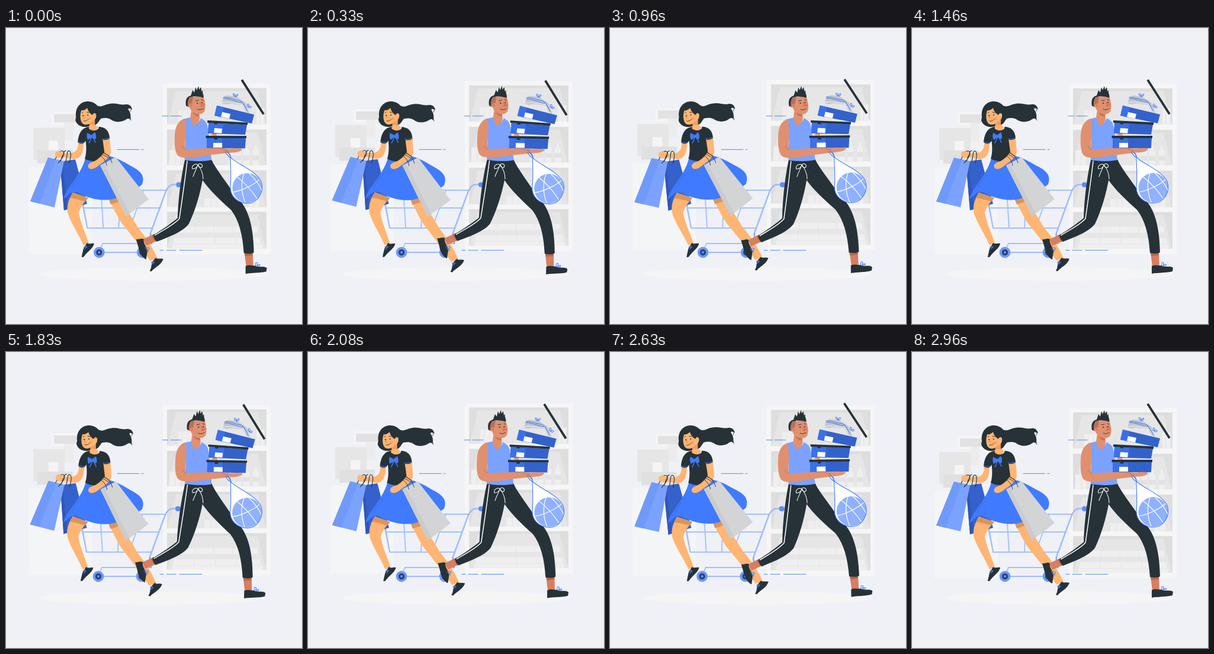
An HTML page that plays this animation: 500x500 px, repeating every 3 s.

```html
<!DOCTYPE html>
<html lang="en">
<head>
<meta charset="utf-8">
<title>Shopping rush</title>
<style>
html, body { margin: 0; width: 100%; height: 100%; overflow: hidden; background: #eff1f6; }
svg { display: block; width: 100%; height: 100%; }
.line { fill: none; stroke-linecap: round; stroke-linejoin: round; }
.blue { stroke: #407bff; }
.dark { stroke: #263238; }
.white { stroke: #fff; }
</style>
</head>
<body>
<svg viewBox="0 0 500 500" xmlns="http://www.w3.org/2000/svg">
  <ellipse cx="250" cy="415.500" rx="193" ry="11.500" fill="#f5f5f5"/>

  <g id="store">
    <path fill="none" stroke="#edeef2" stroke-width=".6" d="M38 54H242V339H38ZM254 54H459V339H254ZM0 382.500H500"/>
    <path fill="#f4f5f6" d="M38 235H145V382.500H38Z"/>
    <path fill="#f5f5f5" d="M77 142H121V164H77Z"/>
    <path fill="#e2e2e3" d="M81 146H119V160H81Z"/>
    <path fill="#ececed" d="M98 160H114V191H98Z"/>
    <path fill="#e6e6e7" d="M46 169H99V223H46Z"/>
    <path fill="#e0e0e1" d="M53 207H113V229H53Z"/>
    <path fill="#f5f5f5" d="M72 191H88V207H72Z"/>
    <path fill="#f6f6f6" d="M265 94.500H447V382.500H265Z"/>
    <g id="bays"></g>
  </g>

  <path class="line blue" stroke-width=".9" d="M264 148.700H274M278 148.700H296M188 205.300H225M229 205.300H232M260 375.400H266M271 375.400H287M293 375.400H331"/>

  <g id="cart">
    <g class="line" stroke="#a3c0ff" stroke-width="1.900">
      <path d="M126 274H271M127 289L137 338H247M130 304H259M160 274L164 338M193 274L190 338M232 274L209 338"/>
      <path d="M126 274L137 338M163 364L157 378M163 364H246"/>
      <path stroke="#7ba2ff" stroke-width="2.200" d="M288 264.500C277 264 274 267 270 275L244 346C242 352 247 356 246 364M157 379H230"/>
      <path stroke="#dce6ff" stroke-width=".7" d="M288 264.500C277 264 274 267 270 275L244 346M157 379H230"/>
    </g>
    <rect x="287" y="260.500" width="9" height="8.500" rx="4" fill="#5b8cf5"/>
    <g id="wheels"></g>
  </g>

  <g id="woman">
    <path fill="#3561cc" d="M91 226L117 222L137 297L98 308Z"/>
    <path fill="#2f57b8" d="M91 226L95 225L104 306L98 308Z"/>
    <path fill="#ffb573" d="M113 278C105 290 102 303 105 314C110 330 123 348 131 367L140 364C136 350 126 330 123 312C126 302 132 294 139 287Z"/>
    <path fill="#d9955c" d="M113 278L139 287L134 293C126 291 117 288 108 287Z"/>
    <path fill="#ffb573" d="M173 288C183 306 188 320 199 334C213 351 229 371 244 393L256 389C250 374 236 352 223 337C213 320 200 300 187 285Z"/>
    <path fill="#d9955c" d="M173 288L187 285L193 293L177 298Z"/>
    <path fill="#263238" d="M131 373L137 363C141 366 145 363 149 364C148 372 138 377 131 387L128 387C129 381 130 378 131 373ZM248 394L253 388C257 391 261 388 266 390C262 401 250 405 246 411L243 410C247 404 245 399 248 394Z"/>
    <path class="line blue" stroke-width="1" d="M137 369C129 375 131 366 137 370M137 370L133 374M250 395C243 400 246 391 251 396L247 399"/>
    <path fill="#407bff" d="M134 220C130 236 119 252 109 266C103 274 99 281 97 289C106 283 110 274 121 278C135 286 155 292 175 290C190 288 220 273 230 264C234 252 231 244 215 235C203 229 193 221 174 216C160 226 145 226 134 220Z"/>
    <path class="line" stroke="#3365d6" stroke-width=".7" d="M127 247C120 254 115 261 111 270"/>

    <path fill="#263238" d="M118 150C116 134 126 124 138 124C147 124 152 129 154 131C161 135 166 129 175 128C186 126 194 131 202 129C208 128 212 132 213 138C210 135 207 135 206 137C210 142 211 148 210 155C207 151 204 153 200 156C192 160 182 159 176 154C170 151 165 152 160 153C156 158 154 164 148 164L136 167C126 168 119 163 117 156Z"/>
    <path class="line dark" stroke-width=".8" d="M204 130C210 131 212 136 210 141M204 150C208 149 210 152 211 156"/>
    <path fill="#f09c5e" d="M141 158L140 169C144 176 152 175 155 168L150 163V155Z"/>
    <path fill="#ffb573" d="M127 139C124 148 125 158 130 162C136 165 142 162 146 157C150 157 153 151 152 146C150 142 147 144 146 147C142 145 138 140 137 135C134 138 130 140 127 139Z"/>
    <path fill="#ffb573" d="M143 163C146 165 152 163 154 168C153 174 144 175 140 169Z"/>
    <circle cx="141" cy="153" r="2.300" fill="#ff8c5a" opacity=".6"/>
    <path class="line dark" stroke-width=".9" d="M128 144L130 142M136 142L140 143M131 157C134 158 137 156 139 154"/>
    <path class="line" stroke="#e07f43" stroke-width=".8" d="M132 147L130 152L133 152"/>
    <g fill="#263238"><circle cx="130" cy="148" r="1"/><circle cx="138" cy="147" r="1"/></g>

    <path fill="#ffb573" d="M122 193C122 204 119 208 112 211L96 212C90 205 82 208 83 214C84 220 92 220 97 218L113 221C125 222 131 214 131 193Z"/>
    <path fill="#263238" d="M137 168C146 176 154 174 158 167L166 170C168 185 167 200 174 216C160 227 145 227 133 221C137 208 135 196 134 186Z"/>
    <path fill="#263238" d="M140 167C127 168 122 180 121 193C125 196 129 196 132 194L139 184Z"/>
    <path fill="#ffb573" d="M163 187L166 209C160 219 150 226 142 228C137 231 138 238 144 238C150 238 154 234 158 231C168 225 177 216 177 209L175 185Z"/>
    <path fill="#263238" d="M156 167C168 167 174 174 175 186C172 189 166 190 162 188Z"/>
    <path class="line blue" stroke-width=".8" d="M122 192C126 194 129 194 132 193M162 187C167 188 171 187 174 185"/>
    <path fill="#407bff" d="M144 181L137 177C136 181 136 186 138 189L144 185L151 188C153 184 152 179 150 176Z"/>
    <path class="line blue" stroke-width="1.500" d="M144 182C144 188 142 191 140 194M145 182C148 186 149 190 151 193"/>
    <path class="line dark" stroke-width=".9" d="M164 211C168 212 171 215 174 216M163 214C167 215 169 217 172 219"/>

    <path fill="#7ba2ff" d="M71 219L98 225L82 303L41 293Z"/>
    <path fill="#709afa" d="M71 219L84 222L57 297L41 293Z"/>
    <path class="line dark" stroke-width="1.100" d="M83 222C88 211 91 206 96 208C101 211 95 221 88 228M101 225C104 215 102 206 107 208C111 211 109 219 107 228M92 225C96 216 96 208 101 207"/>
    <path fill="#ffb573" d="M84 210C88 207 94 208 97 212L92 219C87 220 83 217 83 213Z"/>
    <path fill="#d3d4d6" d="M159 232L185 218L241 289L203 318Z"/>
    <path fill="#cacbcd" d="M159 232L165 229L209 313L203 318Z"/>
    <path class="line dark" stroke-width=".9" d="M163 209C172 214 177 220 179 228M158 215C164 218 169 224 170 232"/>
    <path fill="#ffb573" d="M141 229C147 225 154 224 159 227C156 234 148 239 142 238C137 236 138 231 141 229Z"/>
  </g>

  <g id="man">
    <path fill="#d77f5f" d="M232 357L251 348L257 359L237 368ZM403 379L417 378L418 402L406 403Z"/>
    <path fill="#b8664c" d="M246 351L251 348L257 359L253 361ZM403 379L417 378V384L404 385Z"/>
    <path fill="#263238" d="M220 357C225 358 229 354 233 357C231 364 239 370 239 378L237 391C231 389 225 379 224 371ZM405 402C411 399 417 402 421 401C427 405 436 401 441 405L440 411C430 414 416 413 405 415Z"/>
    <path class="line blue" stroke-width="1" d="M235 372C244 368 245 376 237 374C244 378 241 378 237 374M422 401C420 394 428 394 424 401C432 396 431 404 424 401"/>
    <path fill="#263238" d="M302 223L347 222C352 235 374 262 388 284C408 301 418 330 419 379C414 382 408 381 402 380C400 350 394 325 380 307C362 291 343 273 332 257C328 280 320 308 309 331C298 345 275 353 255 361C251 358 250 354 249 350C265 340 278 331 290 321C291 290 295 255 302 223Z"/>
    <path class="line white" stroke-width="1.500" d="M306 225C302 260 297 294 293 322C283 333 268 340 252 350"/>
    <path class="line white" stroke-width="1" d="M324 231C318 228 313 234 315 238C320 238 323 235 324 231C328 227 333 231 331 235C328 237 325 235 324 231C322 238 318 244 316 251M325 232C330 239 333 247 333 255"/>

    <path fill="#7ba2ff" d="M299 154L311 151C314 163 324 166 329 152L336 157C341 162 340 167 342 177L347 223C332 226 315 225 302 223C300 210 303 200 303 190Z"/>
    <path fill="#e0906f" d="M313 138L326 143L327 152C327 160 321 163 318 166C314 160 311 156 311 151Z"/>
    <path fill="#c9745a" d="M315 142L326 145L326 149C321 150 317 147 315 142Z"/>
    <path fill="#e0906f" d="M310 117L333 115C336 124 338 134 335 141C330 148 321 146 315 142C309 137 308 128 310 117Z"/>
    <path fill="#b5705a" d="M306 133C304 124 306 119 310 116L316 116L314 128L311 134Z"/>
    <path fill="#263238" d="M304 132C302 121 305 116 312 114L315 105L318 109L320 100L322 105L325 98L326 104L329 100L330 107L332 105C331 111 335 114 333 118C325 115 317 115 310 117C307 121 306 127 307 132Z"/>
    <circle cx="312" cy="131" r="3.600" fill="#e0906f"/>
    <circle cx="333" cy="130" r="2.600" fill="#ed665d" opacity=".65"/>
    <path class="line dark" stroke-width=".9" d="M320 123L325 122M330 121L333 122M323 137C326 139 330 138 333 136"/>
    <path class="line" stroke="#aa563e" stroke-width=".8" d="M328 126L331 132L328 132M310 130C312 128 314 131 312 133"/>
    <g fill="#263238"><circle cx="323" cy="127" r="1.100"/><circle cx="331" cy="126" r="1.100"/></g>

    <path fill="#e0906f" d="M346 181C349 176 355 176 356 182Z"/>
    <path fill="#3362cc" d="M339 185H405L404 203H339ZM342 160L407 163L404 180L341 178ZM356 131L419 146L415 161L352 148Z"/>
    <path fill="#3a70ea" d="M339 185H365V203H339ZM342 160L367 161L366 179L341 178ZM356 131L368 134L364 151L352 148Z"/>
    <path fill="#fff" d="M350 194H365V202H350ZM352 169L365 170L364 178L351 177ZM365 142L379 145L377 153L363 150Z"/>
    <path class="line dark" stroke-width="3.800" style="stroke-linecap:butt" d="M337.500 184H406M340 158L408 161.500M398 87.500L435 145.500"/>
    <path class="line dark" stroke-width="3" d="M353 187H356M353 161H356"/>

    <path fill="#c5c6c8" d="M365 128C365 121 367 115 373 114L390 116C393 120 400 122 405 127L411 144L405 142L398 129C389 130 380 126 372 129Z"/>
    <path class="line" stroke="#e4e5e7" stroke-width="1.500" d="M366 126C378 123 388 129 398 127L407 142"/>
    <path class="line blue" stroke-width="1" d="M367 117C376 116 385 121 394 122C401 125 403 133 407 140M367 119C378 119 390 125 397 126M388 116C378 112 386 107 387 115C392 107 394 116 387 115M408 133C405 125 413 128 409 133C418 129 413 139 409 133"/>

    <path fill="#e0906f" d="M302 153C292 156 286 164 285 180C284 195 285 207 289 214C296 223 320 218 340 215L375 211C390 210 397 209 399 204C390 201 381 205 370 203L340 203L303 205C301 196 305 180 302 153Z"/>
    <path class="line" stroke="#b8664c" stroke-width=".7" d="M303 205C300 204 298 202 297 199M364 204C368 206 369 207 374 206"/>

    <path fill="#fff" d="M379 219C394 231 423 242 431 259C437 276 426 295 409 296C391 296 379 284 379 269C381 250 379 235 379 219Z"/>
    <circle cx="407.500" cy="270" r="25" fill="#8fb1ff"/>
    <path class="line white" stroke-width="1.200" d="M384 277C398 275 420 264 428 256M391 252C404 262 416 276 424 288M402 246C396 262 398 280 404 294M411 246C418 252 428 264 432 274"/>
    <path class="line blue" stroke-width="1.100" d="M374 210C379 213 378 219 382 221C396 232 423 242 431 259C437 276 426 295 409 296C391 296 379 284 379 269C381 250 379 235 379 219C376 217 373 215 370 209M372 208C377 211 380 215 379 219"/>
  </g>
</svg>
<script>
const byId = id => document.getElementById(id);
const GOODS = '#efeff0';
const rect = (x, y, w, h, fill = GOODS) => `<rect x="${x}" y="${y}" width="${w}" height="${h}" fill="${fill}"/>`;
const row = (x, y, widths, h) => widths.map(w => {
  const box = rect(x, y, w, h);
  x += w + 1.5;
  return box;
}).join('');
const bottle = (x, y) => rect(x + 3, y - 33, 4, 9) +
  `<rect x="${x}" y="${y - 26}" width="10" height="26" rx="2.500" fill="${GOODS}"/>` +
  rect(x, y - 16, 10, 8, '#e2e2e2');

const bays = [[102, 163], [172, 232], [241, 303], [311, 373]].map(([top, bottom]) =>
  rect(272, top, 168, bottom - top, '#dedede') +
  `<path fill="#e6e6e7" d="M287 ${top + 5}H425L439 ${bottom}H273Z"/>`).join('');

byId('bays').innerHTML = bays +
  row(291, 139, [6, 8, 5], 24) + row(423, 136, [5, 7], 27) +
  [375, 387, 401, 417].map(x => bottle(x, 232)).join('') +
  row(276, 207, [9, 7], 25) + row(335, 289, [10, 8, 12, 10], 14) + row(410, 281, [8, 8], 22) +
  row(291, 336, [28, 30, 30, 42], 10) + row(283, 355, [34, 34, 34, 41], 10) +
  rect(281, 366, 152, 7);

byId('wheels').innerHTML = [157, 230].map(x =>
  `<circle cx="${x}" cy="379" r="9.300" fill="#6e98f5"/>
   <circle cx="${x}" cy="379" r="5.200" fill="#29437f"/>
   <circle cx="${x}" cy="379" r="2" fill="#6e98f5"/>`).join('');

const LEAD = 42;
const phase = (t, period) => (t + LEAD) % period / period;

// Linear swing 0 → 1 → -1 → 0
const swing = p => p < .25 ? 4 * p : p < .75 ? 2 - 4 * p : 4 * p - 4;
// Linear rise and fall 0 → 1 → 0
const bounce = p => 1 - Math.abs(2 * p - 1);

function draw(t) {
  const p = phase(t, 1500);
  const tilt = swing(p);
  byId('store').setAttribute('transform', `translate(0 ${-10 * bounce(p)})`);
  byId('woman').setAttribute('transform', `rotate(${tilt} 140 267)`);
  byId('man').setAttribute('transform', `rotate(${tilt} 331 250)`);
  byId('cart').setAttribute('transform', `translate(${2 * swing(phase(t, 1000))} 0)`);
}

const start = performance.now();
function tick() {
  draw((performance.now() - start) % 3000);
  requestAnimationFrame(tick);
}
tick();
</script>
</body>
</html>
```
